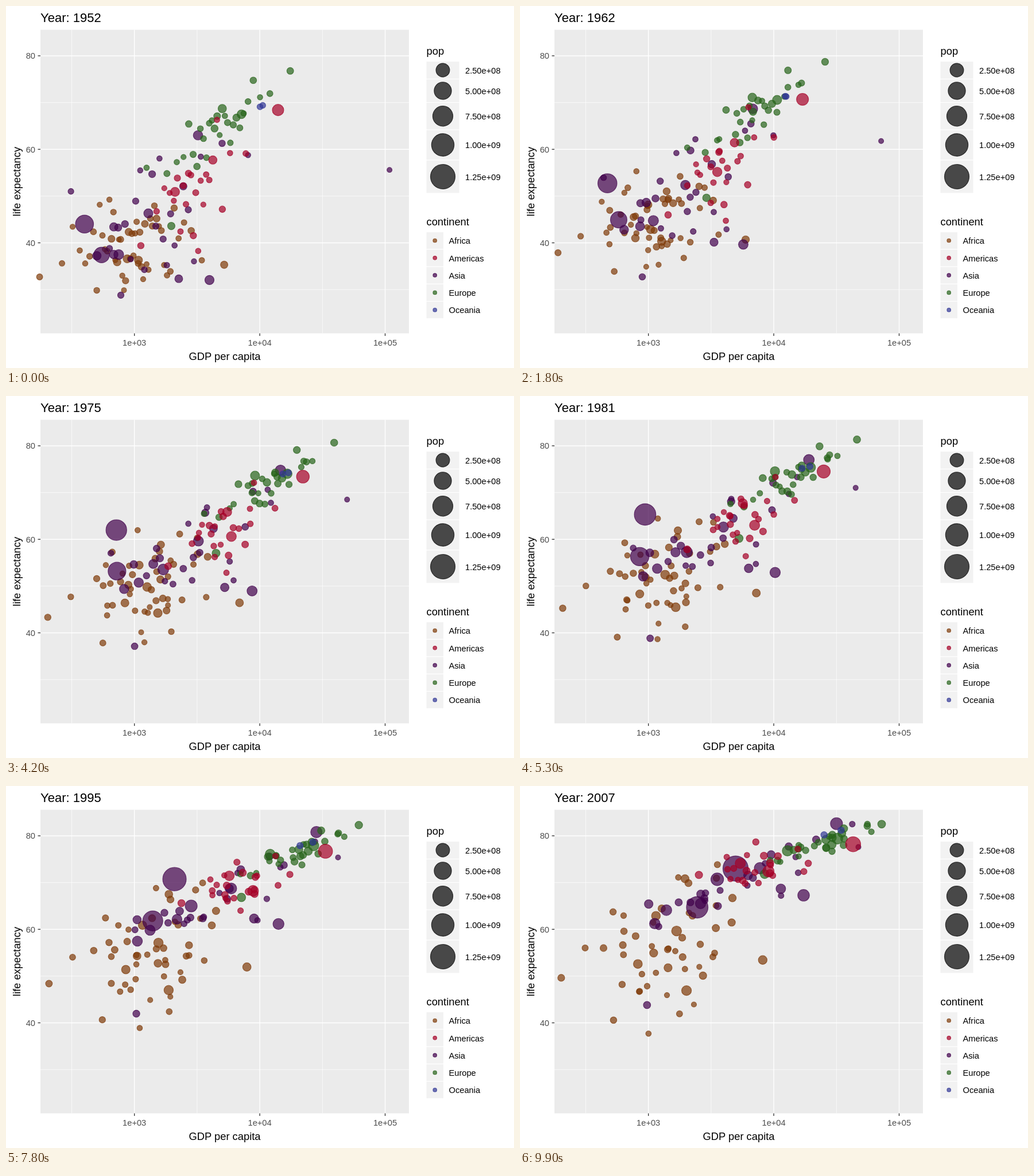
These frames come from a looping animation (885 by 632 pixels, 10000 ms). An HTML page:

```html
<!DOCTYPE html>
<html lang="en">
<head>
<meta charset="utf-8">
<title>Life expectancy and GDP</title>
<style>
html, body { margin: 0; width: 100%; height: 100%; overflow: hidden; background: #fff; }
svg { display: block; font-family: "Liberation Sans", Arial, sans-serif; }
</style>
</head>
<body>
<svg id="chart" width="885" height="632" viewBox="0 0 885 632"></svg>
<script>
const chart = document.getElementById('chart');
const px = gdp => 223.7 + 218.4 * (gdp - 3);   // takes log10 of the GDP
const py = life => 740 - 8.163 * life;
const radius = pop => 4.15 + 0.49 * Math.sqrt(pop);   // population in millions
const MID = 0.535;   // share of the time span at which "mid" points are passed
const GROWTH = 2.4;

// start, end: mean and spread of log GDP, mean life, its slope and its noise.
// bend: extra log GDP and life at mid time. count: countries placed by these rules.
// marked: GDP and life at the start and end, first population, GDP and life at mid time.
const groups = [
  { name: 'Africa', color: '#7F3B08', count: 51, pop: 3, bend: [0.04, 3.5],
    start: [2.98, 0.29, 39, 5, 4.5], end: [3.13, 0.4, 54.8, 8, 7.5],
    marked: [[1077, 36.3, 2014, 46.9, 33]] },
  { name: 'Asia', color: '#40004B', count: 25, pop: 6, bend: [0.07, 2],
    start: [3.2, 0.33, 46.5, 9, 7], end: [3.8, 0.48, 71.3, 11, 3.2],
    marked: [
      [779, 28.8, 975, 43.8, 8],
      [684, 37.5, 1391, 64.1, 47],
      [400, 44, 4959, 73, 556, 940, 65.3],
      [547, 37.4, 2452, 64.7, 372, 852, 56.3],
      [750, 37.5, 3541, 70.7, 82],
      [3217, 63, 31656, 82.6, 70, 19050, 77],
      [108382, 55.6, 47307, 77.6, 0.2, 45000, 71],
      [685, 43.4, 2606, 65.5, 41]
    ] },
  { name: 'Europe', color: '#276419', count: 28, pop: 6, bend: [0.09, 1.5],
    start: [3.67, 0.26, 64.6, 17, 3], end: [4.33, 0.24, 77.7, 9.5, 1],
    marked: [[7144, 67.5, 32170, 79.4, 50], [1969, 43.6, 8458, 71.8, 22]] },
  { name: 'Americas', color: '#A50026', count: 23, pop: 3, bend: [0.07, 1.2],
    start: [3.47, 0.2, 53, 22, 6.5], end: [3.87, 0.25, 73.6, 7, 2.5],
    marked: [
      [2109, 50.9, 9066, 72.4, 57, 7030, 63],
      [13990, 68.4, 42952, 78.2, 140, 25000, 74.5]
    ] },
  { name: 'Oceania', color: '#313695', count: 0, pop: 4, bend: [0, 0],
    marked: [[10040, 69.1, 34435, 81.2], [10557, 69.4, 25185, 80.2]] }
];

let seed = 7;
function random() {
  seed = (seed * 16807) % 2147483647;
  return seed / 2147483647;
}
const noise = () => 2 * (random() + random() + random() - 1.5);

function add(tag, attrs, text = '') {
  const el = document.createElementNS('http://www.w3.org/2000/svg', tag);
  for (const key in attrs) el.setAttribute(key, attrs[key]);
  el.textContent = text;
  return chart.appendChild(el);
}
const rect = (x, y, width, height, fill) => add('rect', { x, y, width, height, fill });
const line = (d, stroke, width) => add('path', { d, stroke, 'stroke-width': width });
const label = (x, y, text, size, fill = '#000', anchor = 'start') =>
  add('text', { x, y, 'font-size': size, fill, 'text-anchor': anchor }, text);
const dot = (cx, cy, r, color) => add('circle', {
  cx, cy, r, fill: color, stroke: color, 'stroke-width': 1.18, 'fill-opacity': 0.7, 'stroke-opacity': 0.7
});

// Panel, grid and axes
rect(60, 41.5, 642, 530, '#ebebeb');
for (const v of [2.5, 3.5, 4.5]) line(`M${px(v)} 41.5V571.5`, '#fff', 0.7);
for (const v of [30, 50, 70]) line(`M60 ${py(v)}H702`, '#fff', 0.7);
for (const v of [3, 4, 5]) {
  line(`M${px(v)} 41.5V571.5`, '#fff', 1.33);
  line(`M${px(v)} 571.5v4.5`, '#333', 1.33);
  label(px(v), 593, `1e+0${v}`, 14.67, '#4d4d4d', 'middle');
}
for (const v of [40, 60, 80]) {
  line(`M60 ${py(v)}H702`, '#fff', 1.33);
  line(`M55.5 ${py(v)}h4.5`, '#333', 1.33);
  label(51, py(v) + 5.5, v, 14.67, '#4d4d4d', 'end');
}
label(381, 618, 'GDP per capita', 18.33, '#000', 'middle');
label(0, 0, 'life expectancy', 18.33, '#000', 'middle').setAttribute('transform', 'translate(25 306.5) rotate(-90)');
const title = label(60, 27.5, '', 22);

// Legends
label(732.5, 85, 'pop', 18.33);
const edges = [96.5, 127.5, 168.5, 216, 269, 327];
['2.50e+08', '5.00e+08', '7.50e+08', '1.00e+09', '1.25e+09'].forEach((text, i) => {
  const top = edges[i], h = edges[i + 1] - top, y = top + h / 2;
  rect(732.5, top + 0.6, 57, h - 1.2, '#f2f2f2');
  dot(761, y, radius(250 * (i + 1)), '#000');
  label(800, y + 5.7, text, 14.67);
});
label(732.5, 383, 'continent', 18.33);
[...groups].sort((a, b) => a.name < b.name ? -1 : 1).forEach(({ name, color }, i) => {
  const y = 409.5 + 30.3 * i;
  rect(732.5, y - 14.5, 29.5, 29, '#f2f2f2');
  dot(747.2, y, 3.26, color);
  label(771.5, y + 5.7, name, 14.67);
});

// A country at rank `g` of wealth and `e` of health within its continent
function place([gdp, spread, life, slope, jitter], g, e) {
  const x = spread * g;
  return [gdp + x, Math.min(82.5, life + slope * x + jitter * e)];
}

function scatter({ count, pop, bend, start, end, color }) {
  return Array.from({ length: count }, (_, i) => {
    const u = (i + 0.5) / count;
    const g = 0.55 * Math.log(u / (1 - u)), e = noise();
    return {
      from: place(start, g, e),
      to: place(end, 0.8 * g + 0.6 * noise(), 0.6 * e + 0.8 * noise()),
      bow: bend, pop: pop * Math.exp(noise()), color
    };
  });
}

function mark({ marked, bend, pop, color }) {
  return marked.map(([gdp, life, gdpEnd, lifeEnd, people = pop, gdpMid, lifeMid]) => {
    const from = [Math.log10(gdp), life], to = [Math.log10(gdpEnd), lifeEnd];
    const mid = gdpMid && [Math.log10(gdpMid), lifeMid];
    const bow = mid ? mid.map((m, k) => m - from[k] - (to[k] - from[k]) * MID) : bend;
    return { from, to, bow, pop: people, color };
  });
}

const bubbles = groups.flatMap(group => [...scatter(group), ...mark(group)]);
for (const b of bubbles) b.el = dot(0, 0, 0, b.color);

function draw(t) {
  const arc = t * (1 - t) / (MID * (1 - MID));
  title.textContent = 'Year: ' + Math.round(1952 + 55 * t);
  for (const { el, from, to, bow, pop } of bubbles) {
    const [x, y] = from.map((a, k) => a + (to[k] - a) * t + bow[k] * arc);
    el.setAttribute('cx', px(x));
    el.setAttribute('cy', py(y));
    el.setAttribute('r', radius(pop * GROWTH ** t));
  }
}

let shown = -1;
function tick() {
  const step = Math.floor(performance.now() / 100) % 100;
  if (step !== shown) draw((shown = step) / 99);
  requestAnimationFrame(tick);
}
tick();
</script>
</body>
</html>
```
